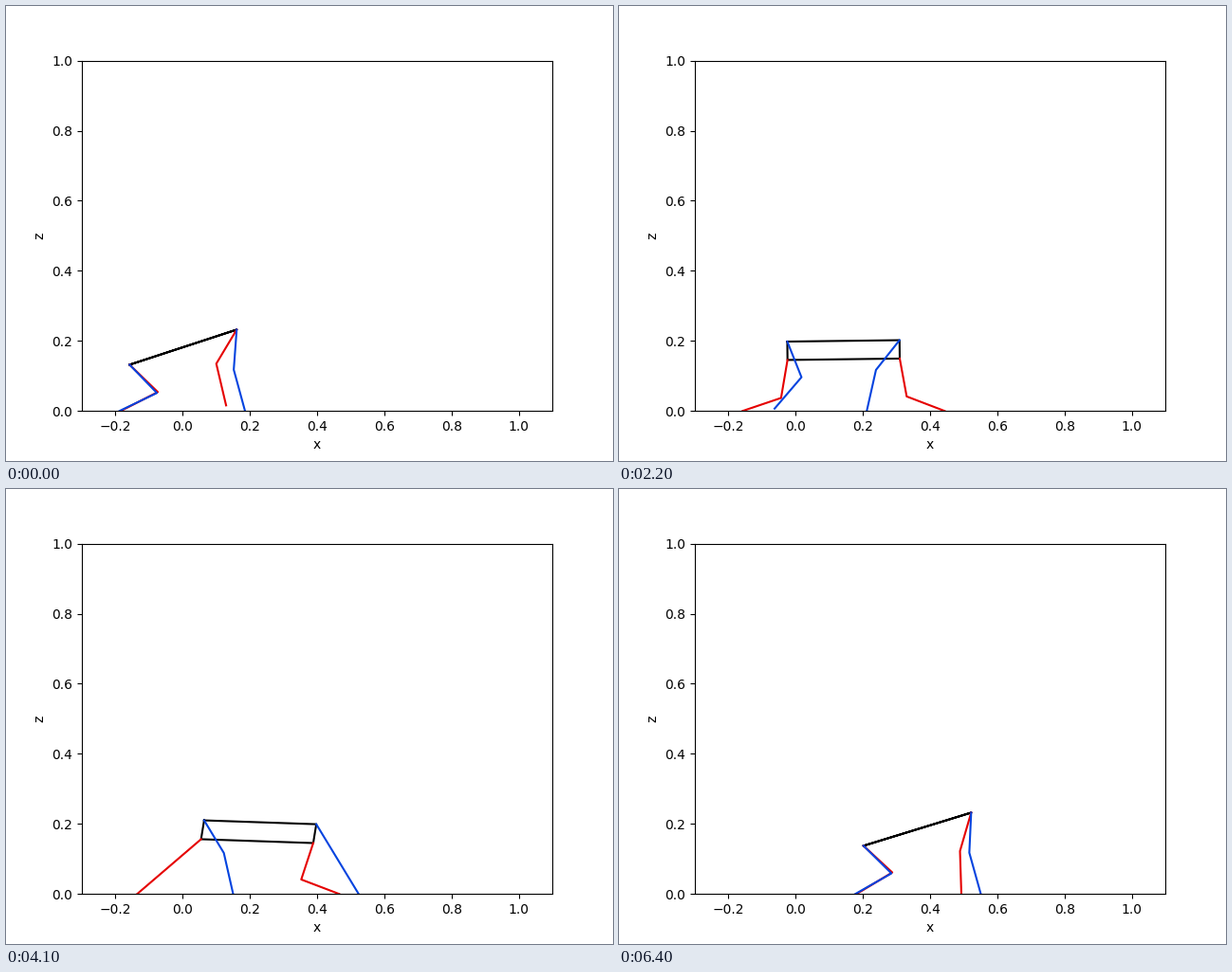
A matplotlib script that plays this animation: 640 by 480 pixels, repeating every 6500 ms.

```python
import numpy as np
import matplotlib.pyplot as plt
from matplotlib.animation import FuncAnimation

FRAMES, STEP = 65, 100
LAST = FRAMES - 1

BODY = 0.334                 # hip to hip
THIGH, SHIN = 0.1145, 0.1225
SLIP = 0.001185              # creep of a standing foot per frame
STRIDE = 0.2896
RIGHT, LEFT = 1, -1


def curve(*keys):
    """Smooth curve through a few (frame, value) points."""
    t, v = np.array(keys, float).T
    slope = np.gradient(v, t)

    def at(n):
        i = min(np.searchsorted(t, n, "right") - 1, len(t) - 2)
        h = t[i + 1] - t[i]
        u = (n - t[i]) / h
        w = u * u * (3 - 2 * u)
        return (v[i] * (1 - w) + v[i + 1] * w
                + h * u * (1 - u) * (slope[i] * (1 - u) - slope[i + 1] * u))
    return at


rear_height = curve((0, 0.132), (14, 0.181), (22, 0.198), (34, 0.200),
                    (48, 0.2145), (56, 0.197), (64, 0.1375))
front_height = curve((0, 0.232), (7, 0.234), (14, 0.2185), (22, 0.202), (31, 0.212),
                     (36, 0.2025), (48, 0.205), (56, 0.228), (64, 0.232))


def tilt(n):
    """Sideways roll, from 0 up to 1 and back."""
    return np.sin(np.pi * n / LAST)


def hips(n):
    """Far rear, far front, near front and near rear corners of the body."""
    x = -0.158 + 0.005623 * n + 0.0113 * np.sin(2 * np.pi * n / LAST)
    rear = np.array([x, rear_height(n)])
    rise = front_height(n) - rear[1]
    front = rear + [np.sqrt(BODY ** 2 - rise ** 2), rise]
    roll = 0.0595 * tilt(n) * np.array([0.22 - 0.0095 * n, -1])
    return rear, front, front + roll, rear + roll


def linear(u):
    return u


def ease(u):
    return u * u * (3 - 2 * u)


def foot(n, x, start, length, lift, pace):
    """A foot creeps along the ground and swings forward once."""
    u = np.clip((n - start) / length, 0, 1)
    height = lift * np.sqrt(abs(np.sin(np.pi * u)))
    return np.array([x + SLIP * n + STRIDE * pace(u), height])


def knee(hip, toe, side, n):
    """Knee position; the links look shorter as the body rolls."""
    a, b = THIGH - 0.005 * tilt(n), SHIN - 0.0025 * tilt(n)
    dist = np.hypot(*(toe - hip))
    d = (toe - hip) / dist
    along = (a * a - b * b + dist * dist) / (2 * dist)
    bend = np.sqrt(max(a * a - along * along, 0))
    return hip + along * d + side * bend * np.array([-d[1], d[0]])


# colour, hip corner, knee side, then the foot: x, start, length, lift, pace
legs = [
    ("xkcd:red", 3, RIGHT, (-0.184, 43.6, 19, 0.0108, linear)),
    ("xkcd:red", 2, LEFT, (0.1276, -0.7, 16, 0.043, ease)),
    ("xkcd:blue", 0, RIGHT, (-0.188, 15.5, 19, 0.007, linear)),
    ("xkcd:blue", 1, LEFT, (0.1855, 23.7, 16, 0.0095, ease)),
]

fig, ax = plt.subplots(figsize=(6.4, 4.8), dpi=100)
ax.set(xlim=(-0.3, 1.1), ylim=(0, 1), xlabel="x", ylabel="z")

body, = ax.plot([], [], color="black", lw=1.5)
lines = [ax.plot([], [], color=leg[0], lw=1.5)[0] for leg in legs]


def draw(n):
    corners = hips(n)
    body.set_data(*np.array([*corners, corners[0]]).T)
    for line, (_, corner, side, step) in zip(lines, legs):
        hip, toe = corners[corner], foot(n, *step)
        line.set_data(*np.array([hip, knee(hip, toe, side, n), toe]).T)
    return [body, *lines]


anim = FuncAnimation(fig, draw, frames=FRAMES, init_func=lambda: draw(0),
                     interval=STEP, repeat=True, repeat_delay=0)
plt.show()
```
